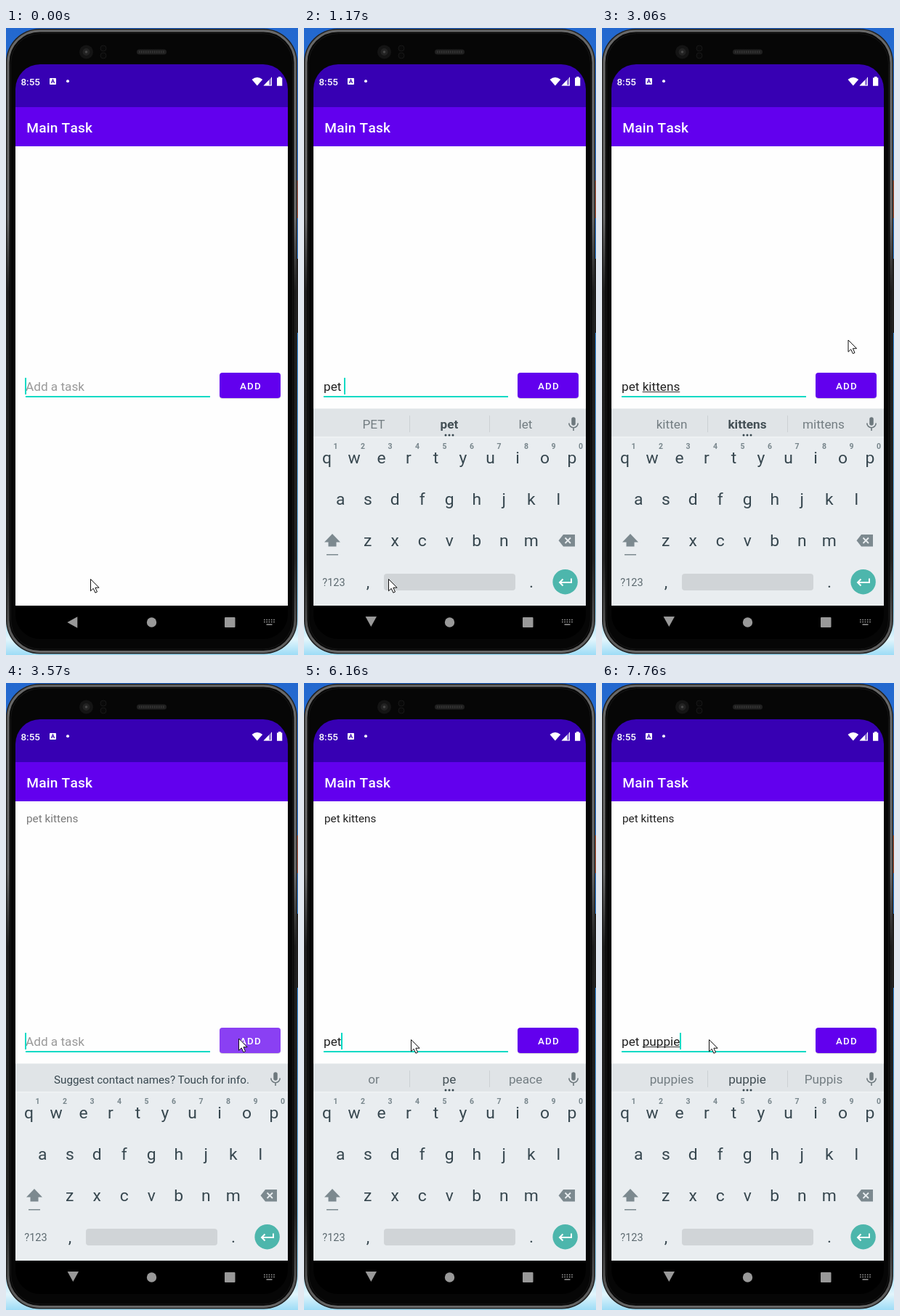
Recreate the animation shown at these times as an HTML page. Size 402 by 864 pixels, loop 8 s.

```html
<!DOCTYPE html>
<html lang="en">
<head>
<meta charset="utf-8">
<title>Task list</title>
<style>
  html, body { margin: 0; width: 100%; height: 100%; overflow: hidden; }
  svg { display: block; width: 100vw; height: 100vh; font-family: Roboto, sans-serif; }
  text { white-space: pre; }
  .mid { text-anchor: middle; }
  .medium { font-weight: 500; }
  .field { font-size: 17.2px; }
  .key { font-size: 22.9px; fill: #37474f; text-anchor: middle; }
  .digit { font-size: 10.5px; font-weight: 700; fill: #78868c; text-anchor: middle; }
  .word { font-size: 17.2px; fill: #737d82; text-anchor: middle; }
  .word.main { fill: #434f55; }
</style>
</head>
<body>
<svg viewBox="0 0 402 864" preserveAspectRatio="none">
  <defs>
    <linearGradient id="desk" x2="0" y2="1">
      <stop offset="0" stop-color="#2368cf"/><stop offset=".5" stop-color="#2f8ade"/>
      <stop offset=".93" stop-color="#8fd3f5"/><stop offset=".975" stop-color="#e2f5fc"/>
      <stop offset="1" stop-color="#9ddcf6"/>
    </linearGradient>
    <linearGradient id="rim" x2="0" y2="1">
      <stop offset="0" stop-color="#686868"/><stop offset=".3" stop-color="#6c6c6c"/>
      <stop offset=".42" stop-color="#1c1c1c"/><stop offset=".85" stop-color="#222"/>
      <stop offset="1" stop-color="#666"/>
    </linearGradient>
    <clipPath id="screen"><rect x="13" y="50" width="375" height="792" rx="34"/></clipPath>
  </defs>

  <rect width="402" height="864" fill="url(#desk)"/>
  <rect x="400.500" y="210" width="1.500" height="52" fill="#b4573a"/>
  <rect x="399" y="318" width="3" height="102" fill="#1c1c1c"/>
  <rect y="1" width="401" height="861.500" rx="46" fill="#222"/>
  <rect x="3" y="4" width="395" height="855.500" rx="43.500" fill="#080808" stroke="url(#rim)" stroke-width="3"/>
  <rect x="6.500" y="7.500" width="388" height="848.500" rx="41" fill="#060606" stroke="#161616"/>
  <circle cx="110.500" cy="33" r="9.500" fill="#141414"/>
  <circle cx="110.500" cy="33" r="5" fill="#232323"/>
  <circle cx="110.500" cy="33" r="1.800" fill="#484848"/>
  <g fill="#090909" stroke="#181818"><circle cx="134" cy="28" r="4"/><circle cx="134" cy="38" r="4"/></g>
  <rect x="180" y="29.500" width="41" height="7" rx="3.500" fill="#202020"/>
  <path d="M183 33H219" stroke="#363636" stroke-width="3" stroke-dasharray="1.500 1.500"/>

  <g clip-path="url(#screen)">
    <rect x="13" y="50" width="375" height="792" fill="#000"/>
    <rect x="13" y="163" width="375" height="633" fill="#fefefe"/>
    <rect x="13" y="50" width="375" height="59" fill="#3700b3"/>
    <rect x="13" y="109" width="375" height="54" fill="#6200ee"/>
    <g fill="#fff">
      <text x="20.500" y="79" font-size="13.400" class="medium">8:55</text>
      <rect x="60" y="69" width="9" height="9" rx="1"/>
      <path d="M62.300 76L64.500 70.800 66.700 76M63.200 74.300H65.800" fill="none" stroke="#3700b3" stroke-width="1.100"/>
      <circle cx="85" cy="73.300" r="2"/>
      <path d="M338.500 71Q345.800 65 353.200 71L345.800 79.500Z"/>
      <path d="M366 67.500V79.500H354.500Z" opacity=".45"/>
      <path d="M362 71.700V79.500H354.500ZM366 67.500V79.500H354.500L355.500 78.500H365V68.500Z"/>
      <path d="M373 68.500H375V67H378.500V68.500H380.300V79.700H373Z"/>
      <text x="28.300" y="144" font-size="19.100" letter-spacing=".2" style="font-kerning: none" class="medium">Main Task</text>
    </g>
    <text id="task" x="28" y="192" font-size="15.270" fill="#212121">pet kittens</text>

    <text id="hint" class="field" x="27" y="500" fill="#999">Add a task</text>
    <text id="entry" class="field" x="27" y="500" fill="#212121"></text>
    <rect id="under" y="501" height="1" fill="#333"/>
    <rect x="27" y="507" width="254" height="2" fill="#03dac5"/>
    <rect id="caret" y="482" width="2" height="23" fill="#03dac5"/>

    <rect x="294" y="476" width="84" height="35" rx="4" fill="#000" opacity=".16"/>
    <rect x="294" y="475" width="84" height="35" rx="4" fill="#6200ee"/>
    <rect id="ripple" x="294" y="475" width="84" height="35" rx="4" fill="#fff"/>
    <text x="337" y="497.700" font-size="13.360" letter-spacing="1.190" class="medium mid" fill="#fff">ADD</text>

    <g id="keyboard">
      <rect x="13" y="525" width="375" height="271" fill="#e9edf0"/>
      <rect x="13" y="524" width="375" height="1" fill="#eef0f1"/>
      <rect x="13" y="525" width="375" height="38" fill="#e0e4e7"/>
      <rect x="13" y="563" width="375" height="1.500" fill="#f0f3f5"/>
      <text id="prompt" class="mid" x="200.500" y="551.500" font-size="15.200" fill="#37474f">Suggest contact names? Touch for info.</text>
      <g id="words">
        <path d="M145.500 534V557M255.500 534V557" stroke="#ccd1d4"/>
        <text class="word" x="96" y="552"></text>
        <text class="word main" x="200" y="552"></text>
        <text class="word" x="305" y="552"></text>
        <g fill="#37474f"><circle cx="195" cy="561" r="1.500"/><circle cx="200" cy="561" r="1.500"/><circle cx="205" cy="561" r="1.500"/></g>
      </g>
      <g stroke="#6d787d" fill="none">
        <path d="M371 539V545" stroke-width="5.500" stroke-linecap="round"/>
        <path d="M364.800 544.500A6.200 6.200 0 0 0 377.200 544.500M371 551V555" stroke-width="1.600"/>
      </g>
      <g id="keys"></g>
      <g fill="#7c898f">
        <path d="M39 697L50 708.500H44.500V714.500H33.500V708.500H28Z"/>
        <rect x="31" y="725" width="16" height="1.500"/>
        <path d="M357 698H373V714.500H357L350.500 706.200Z"/>
      </g>
      <path d="M359.500 702.500L367 710M367 702.500L359.500 710" stroke="#e9edf0" stroke-width="1.800"/>
      <text class="mid" x="41" y="768.500" font-size="14.500" fill="#5d6a70">?123</text>
      <rect x="110" y="752" width="181" height="23" rx="4" fill="#d0d4d7"/>
      <circle cx="359.600" cy="763.200" r="17.200" fill="#4db6ac"/>
      <path d="M368 758.500V764H352.500M356.500 759.500L352 764 356.500 768.500" fill="none" stroke="#fff" stroke-width="2"/>
    </g>

    <g fill="#999">
      <path id="back" d="M-8 0L6 -7.700V7.700Z"/>
      <circle cx="200.500" cy="819" r="6.700"/>
      <rect x="301" y="812" width="14.500" height="14" rx="1"/>
    </g>
    <path d="M355 815.500H370M355 818.500H370" stroke="#999" stroke-width="1.600" stroke-dasharray="1.600 1.700"/>
    <path d="M358.500 822H366.500" stroke="#999" stroke-width="1.500"/>
  </g>
  <path id="mouse" d="M0 0V16.300L3.700 12.800 6.400 18.700 9 17.500 6.400 11.700H11.600Z" fill="#fff" stroke="#111" stroke-width="1"/>
</svg>
<script>
const LOOP = 8000;
const el = id => document.getElementById(id);
const set = (id, attrs) => {
  for (const name in attrs) el(id).setAttribute(name, attrs[name]);
};
const show = (id, on) => set(id, { visibility: on ? 'visible' : 'hidden' });

function addKeyRow(letters, x, y) {
  const key = (cls, dx, ky, label) => `<text class="${cls}" x="${dx}" y="${ky}">${label}</text>`;
  el('keys').innerHTML += [...letters].map((label, i) => key('key', x + i * 37.5, y, label) +
    (letters.length === 10 ? key('digit', x + 12 + i * 37.5, 580, (i + 1) % 10) : '')).join('');
}
addKeyRow('qwertyuiop', 31.5, 600);
addKeyRow('asdfghjkl', 50.3, 657);
addKeyRow('zxcvbnm', 87.8, 714);
addKeyRow(',', 88, 770.5);
addKeyRow('.', 313, 770.5);

const start = {
  keys: false, drop: 0, turn: 0, text: '', line: false, caret: true,
  words: null, bold: false, task: 0, ripple: 0, mouse: [116.5, 759.5]
};

// Each step changes only the listed parts of the state.
const steps = [
  [120, { keys: true, drop: 21, turn: -30 }],
  [240, { drop: 2, turn: -78 }],
  [360, { drop: 0, turn: -90, caret: false }],
  [810, { text: 'p', caret: true }],
  [930, { text: 'pe', words: ['P', 'p', 'o'] }],
  [1050, { text: 'pet', words: ['or', 'pe', 'peace'] }],
  [1170, { text: 'pet ', words: ['PET', 'pet', 'let'], bold: true }],
  [1320, { text: 'pet k' }],
  [1440, { line: true, words: ['K', 'k', 'I'], bold: false }],
  [1590, { text: 'pet kit', line: false }],
  [1740, { text: 'pet kitt', words: ['kit', 'kit', 'kitchen'] }],
  [1860, { words: ['kitten', 'kitt', 'kittens'] }],
  [2030, { text: 'pet kitte', words: ['kitten', 'kitte', 'kittens'], mouse: [117.5, 759.5] }],
  [2180, { text: 'pet kittens' }],
  [2300, { line: true, words: ['kitten', 'kittens', 'mittens'], bold: true }],
  [2700, { caret: false, mouse: [150, 670] }],
  [2820, { mouse: [240, 480] }],
  [2940, { mouse: [315, 354.5] }],
  [3060, { mouse: [339, 430] }],
  [3180, { caret: true, mouse: [328, 480] }],
  [3330, { ripple: .14, mouse: [320.5, 490] }],
  [3450, { ripple: .25, text: '', line: false, words: null, bold: false, task: .2 }],
  [3570, { task: .6 }],
  [3690, { ripple: .16, task: 1 }],
  [3810, { ripple: .07, mouse: [250, 488] }],
  [3930, { ripple: 0, mouse: [157, 481.5] }],
  [4080, { caret: false, mouse: [145.5, 484.5] }],
  [4220, { mouse: [144.5, 488.5] }],
  [4340, { mouse: [144.5, 492] }],
  [4480, { caret: true }],
  [4910, { mouse: [147.5, 491.5] }],
  [5060, { caret: false }],
  [5460, { caret: true }],
  [5580, { text: 'p' }],
  [5730, { text: 'pe', words: ['P', 'p', 'o'] }],
  [5880, { line: true, words: ['or', 'pe', 'peace'] }],
  [6160, { text: 'pet', line: false }],
  [6310, { line: true, words: ['PET', 'pet', 'let'], bold: true }],
  [6560, { text: 'pet ', line: false }],
  [6710, { text: 'pet p', words: null, bold: false }],
  [6860, { line: true, words: ['P', 'p', 'o'] }],
  [6980, { text: 'pet pu', line: false }],
  [7100, { line: true, words: ['put', 'pu', 'purchase'] }],
  [7220, { text: 'pet pup', line: false }],
  [7370, { text: 'pet pupp', words: ['pup', 'pup', 'up'], bold: true }],
  [7490, { words: ['puppy', 'pupp', 'puppet'], bold: false }],
  [7640, { text: 'pet puppie' }],
  [7760, { line: true, words: ['puppies', 'puppie', 'Puppis'] }]
];

const pen = document.createElement('canvas').getContext('2d');
function widthOf(text) {
  pen.font = '17.2px Roboto, sans-serif';
  return pen.measureText(text).width;
}

function draw(s) {
  show('keyboard', s.keys);
  set('keyboard', { transform: `translate(0 ${s.drop})` });
  // The back arrow rises slightly as it turns.
  set('back', { transform: `translate(92.3 ${819 + s.turn / 45}) rotate(${s.turn})` });
  show('hint', !s.text);
  el('entry').textContent = s.text;

  const end = widthOf(s.text);
  const wordStart = widthOf(s.text.slice(0, s.text.lastIndexOf(' ') + 1));
  show('under', s.line);
  set('under', { x: 27 + wordStart, width: end - wordStart });
  show('caret', s.caret);
  set('caret', { x: Math.round(26.45 + end) });

  set('prompt', { display: s.words ? 'none' : 'inline' });
  set('words', { display: s.words ? 'inline' : 'none' });
  document.querySelectorAll('.word').forEach((node, i) => {
    node.textContent = s.words ? s.words[i] : '';
    node.style.fontWeight = s.bold && i === 1 ? 700 : 400;
  });
  set('task', { opacity: s.task });
  set('ripple', { opacity: s.ripple });
  set('mouse', { transform: `translate(${s.mouse})` });
}

const origin = performance.now();
let shown = -1;
function tick() {
  const time = (performance.now() - origin) % LOOP;
  const count = steps.filter(([at]) => at <= time).length;
  if (count !== shown) {
    draw(Object.assign({}, start, ...steps.slice(0, count).map(step => step[1])));
    shown = count;
  }
  requestAnimationFrame(tick);
}
tick();
</script>
</body>
</html>
```
